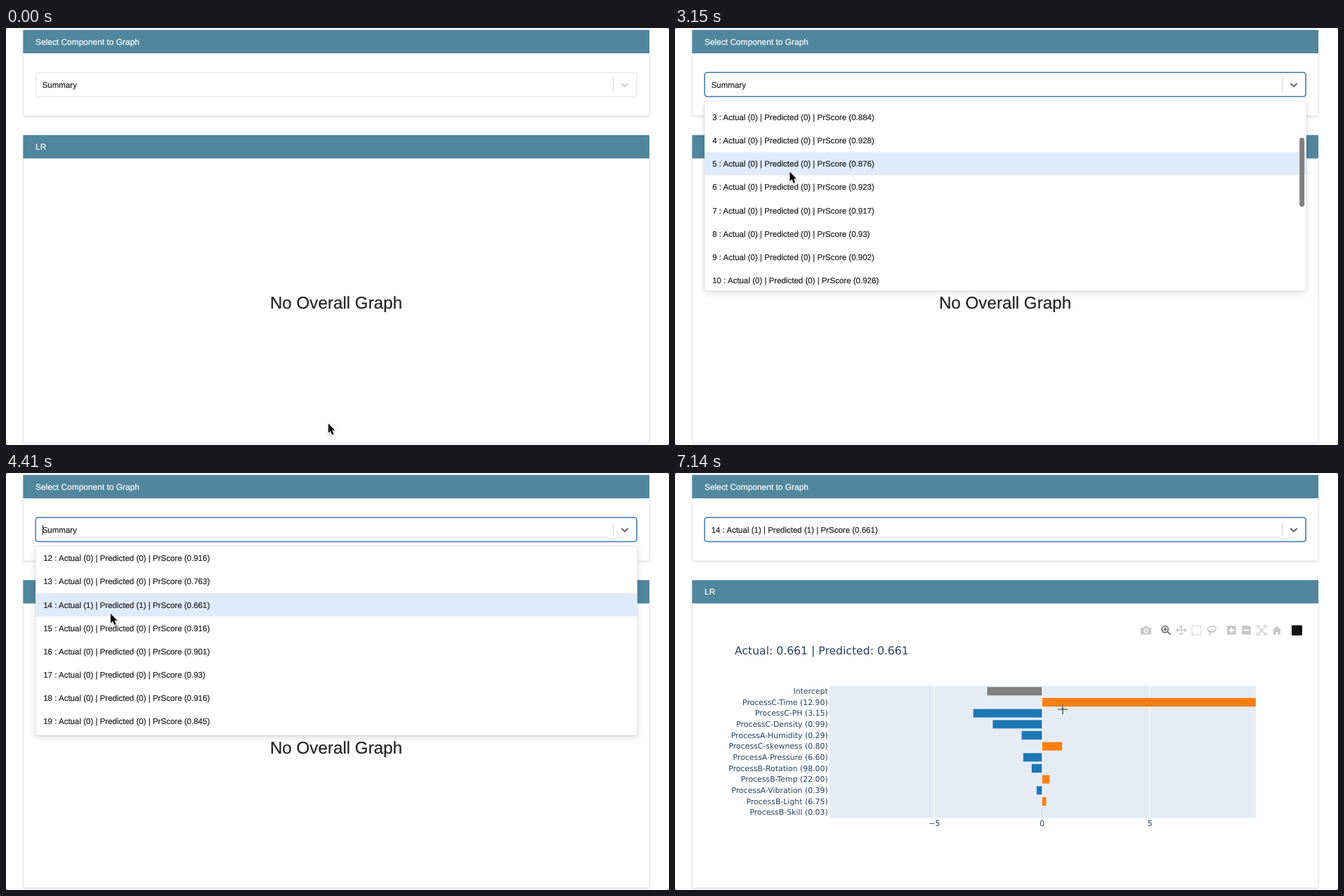
An HTML page for the animation above (8000 ms loop, 944 by 593 pixels).

```html
<!DOCTYPE html>
<html lang="en">
<head>
<meta charset="utf-8">
<title>Component graph</title>
<style>
  html, body { margin: 0; width: 100%; height: 100%; overflow: hidden; background: #fff; }
  svg { display: block; width: 944px; height: 593px; text-rendering: geometricPrecision; }
  text { font: 11.53px "Liberation Sans", Arial, sans-serif; fill: #222; stroke: #222; stroke-width: .2; white-space: pre; }
  .title { font-size: 11.95px; fill: #fff; stroke: #fff; }
  .big { font-size: 24.2px; text-anchor: middle; }
  .white { fill: #fff; stroke: #fff; }
  .chart text { font: 10.9px "DejaVu Sans", Verdana, sans-serif; fill: #2a3f5f; stroke: none; }
  .chart .head { font-size: 15.65px; }
  .card { fill: #fff; stroke: #e4e6ee; filter: drop-shadow(0 1px 1.5px rgba(30, 40, 80, .12)); }
  .bar { fill: #50869e; }
  .menu { fill: #fff; stroke: rgba(0, 0, 0, .12); filter: drop-shadow(0 3px 4px rgba(0, 0, 0, .13)); }
  .arrow { fill: #000; stroke: #fff; stroke-width: 1.6; paint-order: stroke; filter: drop-shadow(0 1px 1px rgba(0, 0, 0, .3)); }
  .line { fill: none; stroke-width: 1.4; }
</style>
</head>
<body>
<svg viewBox="0 0 944 593">
  <path fill="#777" d="M0 0H944V593H0Z"/>
  <rect width="944" height="593" rx="3" fill="#fff"/>

  <rect class="card" x="24.5" y="3" width="891.5" height="122" rx="2"/>
  <rect class="bar" x="24.4" y="2.8" width="891.6" height="33.2"/>
  <text class="title" x="42" y="23.5">Select Component to Graph</text>
  <rect x="42.5" y="63.5" width="855" height="34" rx="3" fill="#fff" stroke="#e3e4e6"/>
  <path d="M864.5 70.5V90" stroke="#d2d2d2"/>
  <path id="chevron" d="M876.3 78.7L881 83.2L885.7 78.7" fill="none" stroke="#ccc" stroke-width="2"/>
  <rect id="focus" x="42.2" y="63.2" width="856" height="34.4" rx="3.5" fill="none" stroke="#4079b3" stroke-width="1.5"/>
  <text id="value" x="51.7" y="84.5"></text>
  <path id="caret" d="M52.5 74V88" stroke="#222"/>

  <rect class="card" x="24.5" y="153" width="891.5" height="437" rx="2"/>
  <rect class="bar" x="24.4" y="152.3" width="891.6" height="33.2"/>
  <text class="title" x="42" y="172.5">LR</text>
  <text id="empty" class="big" x="470" y="399">No Overall Graph</text>

  <g id="chart" class="chart">
    <text class="head" x="85" y="258">Actual: 0.661 | Predicted: 0.661</text>
    <rect x="219.5" y="302.5" width="607.5" height="188" fill="#e5ecf6"/>
    <g id="axis" text-anchor="middle" stroke="#fff"></g>
    <g id="bars" text-anchor="end"></g>
  </g>

  <g id="tools" fill="#c7c7c7" stroke="#c7c7c7" stroke-width="0">
    <path d="M663 220H667L668.5 218H672.5L674 220H678V229.5H663Z"/>
    <circle class="line" cx="670.5" cy="224.4" r="2.5" style="stroke: #fff"/>
    <g class="line" style="stroke: #757575; stroke-width: 1.8">
      <circle cx="697.8" cy="222.3" r="4.6"/>
      <path d="M701.3 225.8L705.5 230M695 222.3H700.6M697.8 219.5V225.1"/>
    </g>
    <path class="line" d="M714 223.5H727.5M720.7 217V230M718.5 219L720.7 217L723 219M718.5 228L720.7 230L723 228M716 221L714 223.5L716 226M725.5 221L727.5 223.5L725.5 226"/>
    <rect class="line" x="736" y="217.5" width="12.5" height="12.5" stroke-dasharray="2 1.57"/>
    <path class="line" d="M761 226C754 220 763 217 767 218C773 219.5 770 226 763.5 226.3C759 226.5 758.5 224 761 224.5C763.5 225.5 762.5 229 760 230.5"/>
    <path d="M786 217.3H798.5V229.7H786ZM807.3 217.3H819.8V229.7H807.3Z"/>
    <path stroke="#fff" stroke-width="1.9" d="M788.5 223.5H796M792.2 219.8V227.2M809.8 223.5H817.3"/>
    <path class="line" d="M832.5 217.5H829V221M838 217.5H841.5V221M832.5 230H829V226.5M838 230H841.5V226.5M831 219.5L839.5 228M839.5 219.5L831 228"/>
    <path d="M850.5 224L857 217.5L863.5 224H861.8V229.8H858.5V226H855.5V229.8H852.2V224Z"/>
    <rect x="878" y="216.5" width="15" height="14.5" rx="1.5" fill="#111"/>
  </g>

  <clipPath id="clip"><rect x="42.5" y="104.5" width="856" height="269" rx="3"/></clipPath>
  <g id="menu">
    <rect class="menu" x="42" y="104" width="857" height="269.5" rx="3.5"/>
    <g clip-path="url(#clip)">
      <g id="list"></g>
      <rect id="thumb" x="889.2" width="7" height="98" rx="3.5" fill="#808080"/>
    </g>
  </g>

  <path id="arrow" class="arrow" d="M0 0V13.2L3 10.5L5.3 15.9L7.6 14.9L5.4 9.7H9.3Z"/>
  <g id="cross">
    <path stroke="#fff" stroke-opacity=".7" stroke-width="2.6" d="M-7 0H7M0-7V7"/>
    <path stroke="#222" stroke-width="1.2" d="M-7 0H7M0-7V7"/>
  </g>
</svg>
<script>
const $ = id => document.getElementById(id);
const LOOP = 8000, STEP = 70;
const OPEN = 2240, PRESS = 4620, PICK = 4760;
const ROW = 33.15, TOP = 108, SCROLL = 434.5;
const ZERO = 522.7, UNIT = 30.68, PLOT_TOP = 302.5, PLOT_H = 188;

// Menu options
const scores = [.928, .931, .935, .884, .928, .876, .923, .917, .93, .902,
  .926, .911, .916, .763, .661, .916, .901, .93, .916, .845];
const options = ['Summary', ...scores.map((s, i) => {
  const c = s < .7 ? 1 : 0;
  return `${i} : Actual (${c}) | Predicted (${c}) | PrScore (${s})`;
})];
$('list').innerHTML = options.map((o, i) => {
  const y = TOP + i * ROW;
  return `<rect x="42" y="${y}" width="857" height="${ROW}"/>
    <text class="${i ? '' : 'white'}" x="53.2" y="${y + 20.8}">${o}</text>`;
}).join('');
const rows = [...$('list').querySelectorAll('rect')];

// Chart
const effects = {
  'Intercept': -2.56, 'ProcessC-Time (12.90)': 9.92, 'ProcessC-PH (3.15)': -3.2,
  'ProcessC-Density (0.99)': -2.3, 'ProcessA-Humidity (0.29)': -.96, 'ProcessC-skewness (0.80)': .93,
  'ProcessA-Pressure (6.60)': -.88, 'ProcessB-Rotation (98.00)': -.49, 'ProcessB-Temp (22.00)': .35,
  'ProcessA-Vibration (0.39)': -.26, 'ProcessB-Light (6.75)': .2, 'ProcessB-Skill (0.03)': -.02
};
$('axis').innerHTML = [-5, 0, 5].map(v => {
  const x = ZERO + v * UNIT;
  return `<path d="M${x} ${PLOT_TOP}v${PLOT_H}" stroke-width="${v ? 1 : 1.7}"/>
    <text x="${x}" y="502">${String(v).replace('-', '−')}</text>`;
}).join('');
const band = PLOT_H / 12;
$('bars').innerHTML = Object.entries(effects).map(([label, v], i) => {
  const y = PLOT_TOP + (i + .5) * band;
  const fill = !i ? '#7f7f7f' : v > 0 ? '#ff7f0e' : '#1f77b4';
  return `<text x="217.7" y="${y + 3.8}">${label}</text>
    <rect x="${ZERO + Math.min(v, 0) * UNIT}" y="${y - band * .4}" width="${Math.abs(v) * UNIT}"
      height="${band * .8}" fill="${fill}" stroke="#e5ecf6" stroke-width=".5"/>`;
}).join('');

// Pointer moves: start, end, x, y
const home = [459, 562.5];
const moves = [
  [0, 210, 266, 71], [350, 630, 267, 77], [1610, 1680, 222.5, 75], [1680, 1890, 185, 78],
  [2520, 2730, 163.5, 204.5], [3430, 3640, 150.5, 271], [3710, 4060, 150, 215], [4200, 4410, 149, 200],
  [PRESS, PICK, 149.5, 197.5], [5250, 5670, 150, 281], [5740, 6020, 218, 258], [6020, 6440, 158, 326],
  [6650, 6930, 602, 347], [6930, 7140, 552, 336]
];
const ramp = (t, a, b) => Math.min(1, Math.max(0, (t - a) / (b - a)));
const smooth = p => p * p * (3 - 2 * p);
const easeOut = p => 1 - (1 - p) ** 2;
const pointer = t => moves.reduce(([x, y], [a, b, toX, toY]) => {
  const p = smooth(ramp(t, a, b));
  return [x + (toX - x) * p, y + (toY - y) * p];
}, home);
// Two swipes on the wheel
const scrolled = t => SCROLL * (.3 * easeOut(ramp(t, 2870, 3150)) + .7 * easeOut(ramp(t, 3220, 3570)));

const show = (id, on) => $(id).setAttribute('opacity', +on);
const move = (id, x, y) => $(id).setAttribute('transform', `translate(${x} ${y})`);

function draw(t) {
  const [x, y] = pointer(t), scroll = scrolled(t);
  const done = t >= PICK;
  const inPlot = done && x > 219.5 && y > PLOT_TOP;

  const focus = ramp(t, 1050, 1260), grey = 204 - 102 * focus;
  show('focus', focus);
  $('chevron').setAttribute('stroke', `rgb(${grey},${grey},${grey})`);
  show('caret', t >= 1170 && !done && (t - 1170) % 1050 < 500);
  $('value').textContent = options[done ? 15 : 0];

  show('menu', t >= OPEN && !done);
  const hover = t < 2590 ? 0 : Math.floor((y - TOP + scroll) / ROW);
  rows.forEach((r, i) => r.setAttribute('fill',
    !i ? '#2684ff' : i !== hover ? '#fff' : t >= PRESS ? '#b2d4ff' : '#dfebfd'));
  move('list', 0, -scroll);
  move('thumb', 0, 106 + scroll / SCROLL * 166.7);
  show('thumb', t < 2940 ? 0 : 1 - ramp(t, 3850, 4060));

  show('empty', !done);
  show('chart', done);
  show('tools', ramp(t, 5320, 5600));

  show('arrow', !inPlot);
  show('cross', inPlot);
  move('arrow', x, y);
  move('cross', x, y);
}

const start = performance.now();
function tick(now) {
  const t = Math.max(0, now - start) % LOOP;
  draw(Math.floor(t / STEP + 1e-6) * STEP);
  requestAnimationFrame(tick);
}
draw(0);
requestAnimationFrame(tick);
</script>
</body>
</html>
```
